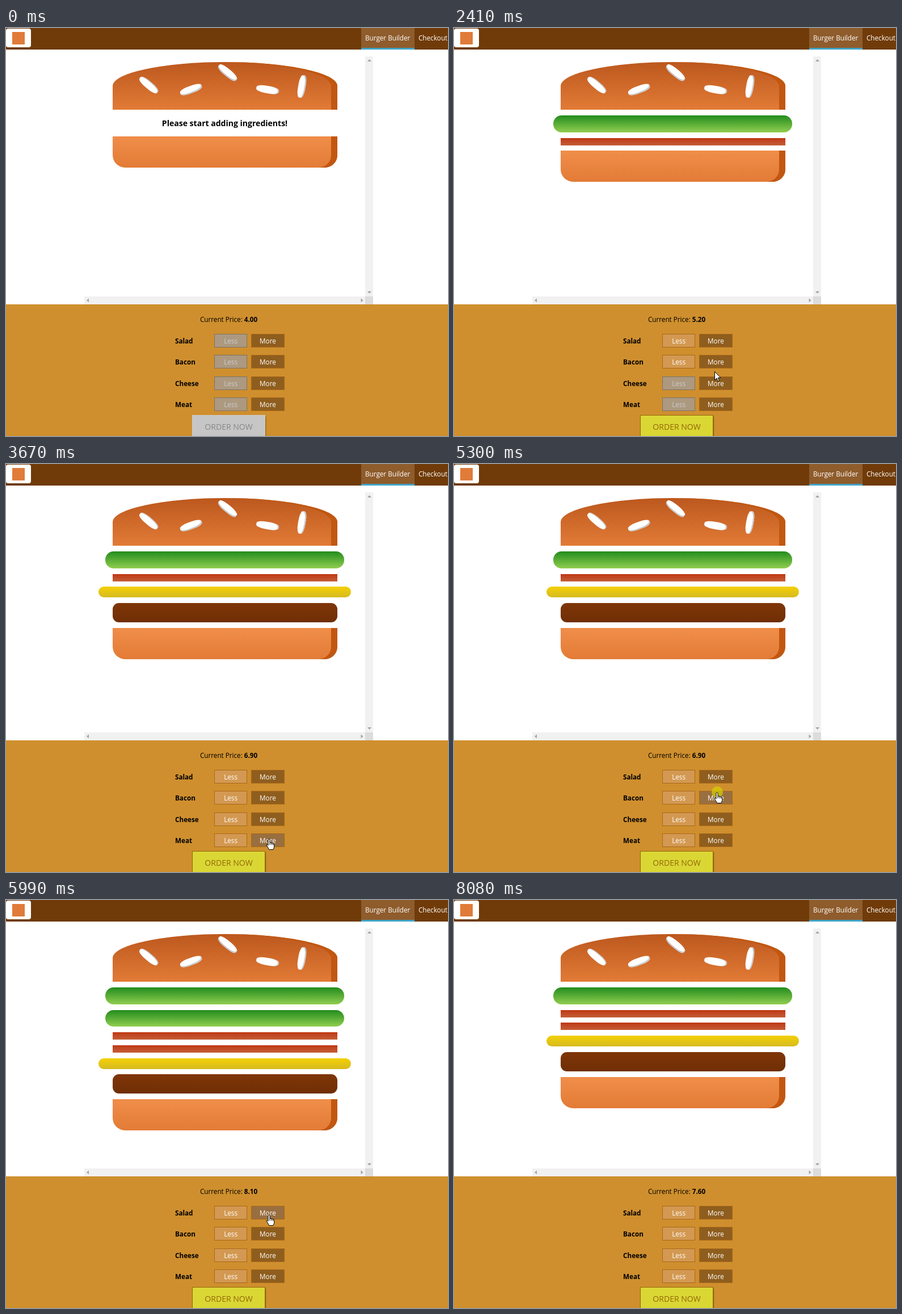
An HTML page that plays this animation: 779 px wide and 719 px high, repeating every 9240 ms.

```html
<!DOCTYPE html>
<html lang="en">
<head>
<meta charset="utf-8">
<title>Burger Builder</title>
<style>
  * { box-sizing: border-box; }
  html, body { margin: 0; width: 100%; height: 100%; overflow: hidden; background: #fff; }
  body { font: 11.7px/16px "Open Sans", sans-serif; color: #000; }
  #stage { position: relative; width: 779px; height: 719px; overflow: hidden; }
  #stage > *, nav *, #controls * { position: absolute; white-space: nowrap; }

  nav { left: 0; top: 0; width: 779px; height: 38px; background: #703b09; color: #fff; }
  nav a { top: 0; height: 38px; padding: 0 7px; line-height: 34px; }
  nav .active { left: 626px; width: 94px; background: #8f5c2c; border-bottom: 3px solid #40a4c8; }
  .tile { left: 0; top: 1px; width: 44px; height: 33px; border-radius: 4px; background: #fff; }
  .mark { left: 11px; top: 6px; width: 22px; height: 22px; background: #e07b39; }

  #burger { left: 138px; top: 50px; width: 495px; height: 423px; overflow: hidden; }
  #burger > div { width: 80%; margin: 2% auto; }
  #burger p { margin: 13.7px 0; text-align: center; font: bold 14.04px/19px "Open Sans", sans-serif; }
  #burger .top {
    position: relative; height: 20%; border-radius: 50% 50% 0 0;
    background: linear-gradient(#bc581e, #e27b36); box-shadow: inset -11px 0 #c15711;
  }
  #burger .bottom {
    height: 13%; border-radius: 0 0 22px 22px;
    background: linear-gradient(#f08e4a, #e27b36); box-shadow: inset -11px 0 #c15711;
  }
  #burger .salad { width: 85%; height: 7%; border-radius: 14.6px; background: linear-gradient(#228c1d, #91ce50); }
  #burger .bacon { height: 3%; background: linear-gradient(#bf3813, #c45e38); }
  #burger .cheese { width: 90%; height: 4.5%; border-radius: 14.6px; background: linear-gradient(#f4d004, #d6bb22); }
  #burger .meat { height: 8%; border-radius: 11px; background: linear-gradient(#7f3608, #702e05); }

  .seed, .seed::before, .seed::after { position: absolute; border-radius: 40%; background: #fff; }
  .seed { width: 10%; height: 15%; top: 50%; }
  .seed::before, .seed::after { width: 100%; height: 100%; }
  .s1 { left: 30%; transform: rotate(-20deg); box-shadow: inset -1.5px -2.2px #c9c9c9; }
  .s1::after { content: ""; left: -170%; top: -260%; transform: rotate(60deg); box-shadow: inset -1px 1.5px #c9c9c9; }
  .s1::before { content: ""; left: 180%; top: -50%; transform: rotate(60deg); box-shadow: inset -1px -2.2px #c9c9c9; }
  .s2 { left: 64%; transform: rotate(10deg); box-shadow: inset -2.2px 0 #c9c9c9; }
  .s2::before { content: ""; left: 150%; top: -130%; transform: rotate(90deg); box-shadow: inset 1px 2.2px #c9c9c9; }

  .bar { background: #f1f1f1; }
  .vert { left: 633px; top: 50px; width: 14px; height: 423px; }
  .horz { left: 138px; top: 473px; width: 495px; height: 14px; }
  .corner { left: 633px; top: 473px; width: 14px; height: 14px; background: #dcdcdc; }

  #controls { left: 0; top: 487px; width: 779px; height: 232px; background: #cf8f2e; }
  #price { left: 342px; top: 18px; }
  #price b { position: static; }
  .label { left: 298px; font-weight: bold; line-height: 24px; }
  .btn { width: 58.4px; height: 24px; line-height: 22px; text-align: center; color: #fff; border: 1px solid #aa6817; }
  .less { left: 366.9px; background: #d39952; }
  .more { left: 432.2px; background: #8f5e1e; }
  .less.hover { background: #daa972; }
  .more.hover { background: #996f40; }
  .less.off { background: #ac9980; border-color: #7e7365; color: #ccc; }
  #order {
    left: 328px; top: 195px; width: 129px; height: 41px; text-align: center;
    font-size: 14.04px; line-height: 39px; color: #966909; background: #dad735;
    border: 1px solid #966909; box-shadow: 1.5px 1.5px 1.5px #966909;
  }
  #order.off { background: #c7c6c6; border-color: #ccc; color: #888; }
  #overlay { left: 0; top: 0; }
</style>
</head>
<body>
<div id="stage">
  <nav>
    <div class="tile"><div class="mark"></div></div>
    <a class="active">Burger Builder</a>
    <a style="left:720px">Checkout</a>
  </nav>
  <div id="burger"></div>
  <div class="bar vert"></div>
  <div class="bar horz"></div>
  <div class="corner"></div>
  <div id="controls">
    <div id="price">Current Price: <b></b></div>
    <div id="order">ORDER NOW</div>
  </div>
  <svg id="overlay" width="779" height="719">
    <path fill="#a3a3a3" d="M637 59h7l-3.5-4zM637 464h7l-3.5 4zM146 476.500v7l-4-3.500zM625.500 476.500v7l4-3.500z"/>
    <circle id="ring" r="10" fill="#d4d000" opacity=".7"/>
    <g id="cursor" fill="#fff" stroke="#000" stroke-linejoin="round">
      <path id="arrow" d="M.5 .5V15.500l3.500-3.300 2.400 5.400 2.200-1-2.400-5.200h4.600z"/>
      <path id="hand" d="M-2 2.500a1.500 1.500 0 0 1 3 0V7.500q2.500-1 3 .6q2-.6 2.700.8q2-.3 2 1.500v4.600l-1.700 4.500h-7.500l-1.700-3.500-2.600-4q-.3-2 1.200-1.400l1.600 1.600zM1 7.500v3.500M4 8.100v3.200M6.700 8.900v2.700"/>
    </g>
  </svg>
</div>
<script>
const LOOP = 9240, ROW_TOP = 539, ROW_STEP = 37.3, FRAME = 77;
const ITEMS = ["salad", "bacon", "cheese", "meat"];
const COST = { salad: 0.5, bacon: 0.7, cheese: 0.4, meat: 1.3 };
const SHOWN = [300, 8080], ENTRY = [644, 673], ENABLED = 1700;

// Pointer moves: first step, last step, step count, destination
const MOVES = [
  [380, 460, 2, 520, 486],
  [690, 920, 4, 457, 543],
  [1070, 1150, 2, 455, 550],
  [1850, 2010, 3, 455, 588],
  [2330, 2410, 2, 459, 605],
  [2490, 2490, 1, 460, 617],
  [2880, 2960, 2, 460, 620],
  [3110, 3260, 3, 464, 664],
  [3590, 3670, 2, 464, 660],
  [4220, 5070, 12, 465, 579],
  [5150, 5150, 1, 464, 578],
  [5700, 5780, 2, 464, 554],
  [6240, 6470, 4, 440, 558],
  [6550, 6770, 4, 398, 551],
  [7160, 7160, 1, 398, 550],
  [7310, 7540, 4, 410, 631],
  [7610, 7760, 3, 489, 630],
  [7930, 8000, 2, 485, 683]
];

// Clicks: ring on, count change, ring off, item, amount
const CLICKS = [
  [1620, 1700, 1780, "salad", 1],
  [2180, 2260, 2330, "bacon", 1],
  [2720, 2800, 2880, "cheese", 1],
  [3430, 3510, 3590, "meat", 1],
  [5300, 5380, 5470, "bacon", 1],
  [5860, 5930, 5990, "salad", 1],
  [6930, 7000, 7000, "salad", -1]
];

const $ = id => document.getElementById(id);
const controls = $("controls"), price = document.querySelector("#price b");

function add(cls, text, top) {
  const el = document.createElement("div");
  el.className = cls;
  el.textContent = text;
  el.style.top = top + "px";
  controls.insertBefore(el, $("order"));
  return el;
}

const rows = ITEMS.map((name, i) => {
  const y = ROW_TOP + ROW_STEP * i, top = y - 487;
  add("label", name[0].toUpperCase() + name.slice(1), top);
  return { name, y, less: add("btn less", "Less", top), more: add("btn more", "More", top) };
});

function pointerAt(t) {
  let [x, y] = ENTRY;
  for (const [from, to, n, x2, y2] of MOVES) {
    if (t < from) break;
    const k = t >= to ? n : Math.floor((t - from) / (to - from) * (n - 1)) + 1;
    x += (x2 - x) * k / n;
    y += (y2 - y) * k / n;
  }
  return [x, y];
}

let drawn = "";
function drawBurger(counts) {
  const key = Object.values(counts).join();
  if (key === drawn) return;
  drawn = key;
  const layer = (cls, inside = "") => `<div class="${cls}">${inside}</div>`;
  const filling = ITEMS.map(n => layer(n).repeat(counts[n])).join("");
  $("burger").innerHTML =
    layer("top", layer("seed s1") + layer("seed s2")) +
    (filling || "<p>Please start adding ingredients!</p>") +
    layer("bottom");
  price.textContent = ITEMS.reduce((sum, n) => sum + COST[n] * counts[n], 4).toFixed(2);
  $("order").classList.toggle("off", !filling);
}

function orderScale(t) {
  const p = Math.floor((t - ENABLED) / FRAME) * FRAME / 300;
  if (p <= 0 || p >= 1) return 1;
  return 1 + 0.1 * (p < 0.6 ? p / 0.6 : (1 - p) / 0.4);
}

function render(t) {
  const counts = { salad: 0, bacon: 0, cheese: 0, meat: 0 };
  let ring = false;
  for (const [on, change, off, item, amount] of CLICKS) {
    if (t >= change) counts[item] += amount;
    if (t >= on && t < off) ring = true;
  }
  drawBurger(counts);
  $("order").style.transform = `scale(${orderScale(t)})`;

  const visible = t >= SHOWN[0] && t < SHOWN[1];
  const [x, y] = pointerAt(t);
  let over = false;
  for (const { name, y: top, less, more } of rows) {
    const inRow = visible && y >= top && y < top + 24;
    const onLess = inRow && counts[name] > 0 && x >= 367 && x < 425;
    const onMore = inRow && x >= 432 && x < 491;
    less.classList.toggle("off", !counts[name]);
    less.classList.toggle("hover", onLess);
    more.classList.toggle("hover", onMore);
    over = over || onLess || onMore;
  }

  const place = `translate(${Math.round(x)} ${Math.round(y)})`;
  const show = (id, on) => $(id).setAttribute("display", on ? "inline" : "none");
  $("cursor").setAttribute("transform", place);
  $("ring").setAttribute("transform", place);
  show("cursor", visible);
  show("ring", ring);
  show("hand", over);
  show("arrow", !over);
}

const start = performance.now();
function tick() {
  render((performance.now() - start) % LOOP);
  requestAnimationFrame(tick);
}
tick();
</script>
</body>
</html>
```
